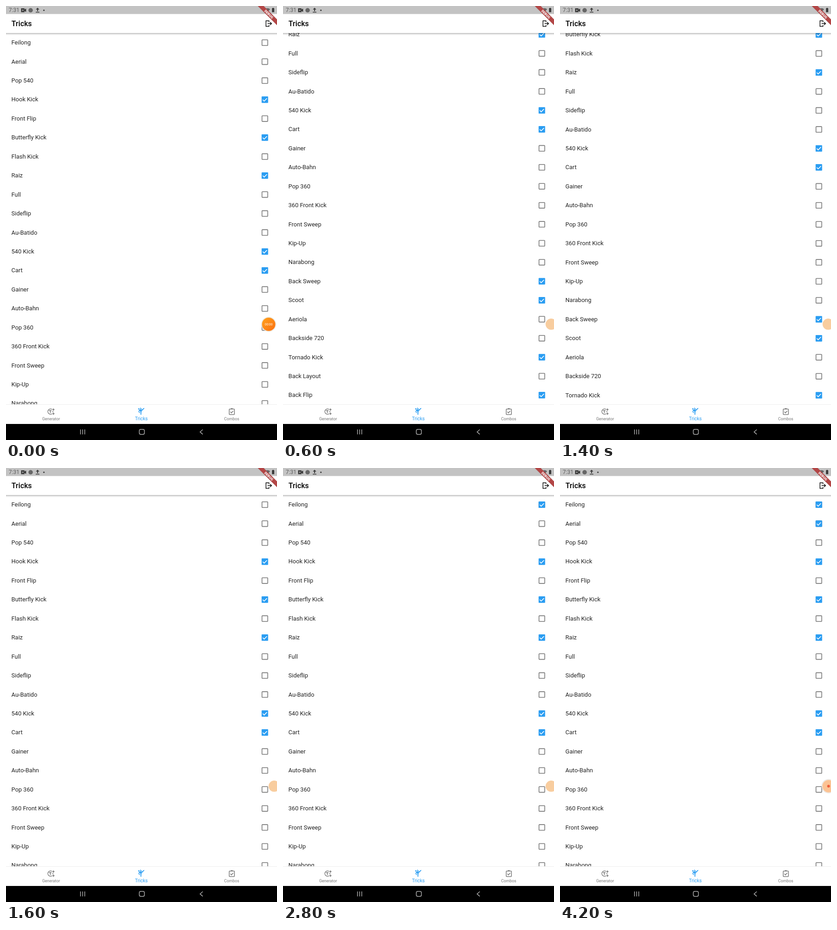
These frames come from a looping animation (592 px wide and 947 px high, 4.3 s). An HTML page:

```html
<!DOCTYPE html>
<html lang="en">
<head>
<meta charset="utf-8">
<title>Tricks</title>
<style>
  html, body { margin: 0; width: 100%; height: 100%; overflow: hidden; background: #fff; }
  svg { display: block; font-family: Roboto, "Liberation Sans", sans-serif; }
  .line { fill: none; stroke-width: 1.5; }
  .row text { font-size: 13px; fill: #242424; }
  .empty { fill: none; stroke: #777; stroke-width: 1.6; }
  .fill { fill: #2a9df2; }
  .tick { fill: none; stroke: #fff; stroke-width: 1.6; }

  /* Everything moves in 100 ms steps over a 4300 ms loop */
  .anim { animation: 4300ms step-end infinite; }
  #list { animation-name: scroll; }
  #glow { animation-name: glow; opacity: 0; }
  #ball { animation-name: ball; }
  #docked { animation-name: docked; opacity: 0; }
  #pressed { animation-name: pressed; opacity: 0; }
  .half { animation-name: half; opacity: 0; }
  .on0 { animation-name: on0; opacity: 0; }
  .on1 { animation-name: on1; opacity: 0; }

  @keyframes scroll {
    0% { transform: translateY(0); }
    4.65% { transform: translateY(-40px); }
    6.97% { transform: translateY(-165px); }
    9.3% { transform: translateY(-265px); }
    11.62% { transform: translateY(-302px); }
    13.95% { transform: translateY(-308px); }
    32.55% { transform: translateY(-225px); }
    34.88% { transform: translateY(-55px); }
    37.2%, 100% { transform: translateY(0); }
  }
  @keyframes glow {
    0% { opacity: 0; transform: translateY(30px); }
    18.6% { opacity: .6; transform: translateY(30px); }
    20.93% { opacity: 1; transform: translateY(0); }
    23.25% { opacity: .5; transform: translateY(20px); }
    25.58%, 100% { opacity: 0; transform: translateY(30px); }
  }
  @keyframes ball { 0% { opacity: 1; } 4.65%, 100% { opacity: 0; } }
  @keyframes docked { 0% { opacity: 0; } 4.65% { opacity: 1; } 97.67%, 100% { opacity: 0; } }
  @keyframes pressed { 0% { opacity: 0; } 97.67%, 100% { opacity: 1; } }
  @keyframes half { 0% { opacity: 0; } 62.79% { opacity: 1; } 65.11%, 100% { opacity: 0; } }
  @keyframes on0 { 0% { opacity: 0; } 65.11%, 100% { opacity: 1; } }
  @keyframes on1 { 0% { opacity: 0; } 81.39%, 100% { opacity: 1; } }
</style>
</head>
<body>
<svg width="592" height="947" viewBox="0 0 592 947">
  <defs>
    <clipPath id="view"><rect y="59" width="592" height="811"/></clipPath>
    <linearGradient id="shade" x2="0" y2="1">
      <stop stop-color="#000" stop-opacity=".3"/>
      <stop offset=".4" stop-color="#000" stop-opacity=".12"/>
      <stop offset="1" stop-color="#000" stop-opacity="0"/>
    </linearGradient>
    <linearGradient id="orange" x2="1" y2="1">
      <stop stop-color="#ffa21c"/>
      <stop offset="1" stop-color="#fb7012"/>
    </linearGradient>
  </defs>
  <rect width="592" height="947" fill="#fff"/>

  <g clip-path="url(#view)">
    <g id="list" class="anim"></g>
    <circle id="glow" class="anim" cx="310" cy="2315" r="1515" fill="#2187c8" fill-opacity=".095"/>
  </g>

  <!-- App bar -->
  <rect y="59" width="592" height="5" fill="url(#shade)"/>
  <rect y="17" width="592" height="42" fill="#fff"/>
  <text x="12" y="43.8" font-size="16.2" font-weight="500">Tricks</text>
  <g class="line" stroke="#111">
    <path d="M574.5 35V32.2H567.9V44.4H574.5V41.6M571.5 38.3H580M577 35.2L580.1 38.3L577 41.4"/>
  </g>

  <!-- Status bar -->
  <rect width="592" height="17.5" fill="#c3c3c3"/>
  <text x="6" y="13.4" font-size="12" fill="#5c5c5c">7:31</text>
  <g fill="#3c3c3c">
    <path d="M33 5H40.5V7.8L44 5.5V13L40.5 10.7V13.5H33Z"/>
    <path d="M35 9.2H38.5M36.8 7.5V11" stroke="#c3c3c3"/>
    <circle cx="53.8" cy="9.3" r="4.8" fill="#666"/>
    <path d="M69 3.8L72.8 7.8H70V11.5H68V7.8H65.2ZM65 12.8H73V14.2H65Z"/>
    <circle cx="82.8" cy="9.3" r="1.6"/>
    <path d="M566 7Q571.5 2.5 577 7L571.5 13.5Z" fill="#666"/>
    <path d="M581 5H582.3V4H584.7V5H586V13.5H581Z"/>
  </g>
  <g transform="translate(592 0) rotate(45)">
    <rect x="-32" y="20.3" width="64" height="9.8" fill="#000" opacity=".12"/>
    <rect x="-32" y="20.7" width="64" height="8.9" fill="#b34646"/>
    <text y="27.8" font-size="7.4" font-weight="900" text-anchor="middle" fill="#fff">DEBUG</text>
  </g>

  <!-- Tab bar -->
  <rect y="869" width="592" height="43" fill="#fff"/>
  <rect y="869" width="592" height="1" fill="#eee"/>
  <g font-size="8.9" text-anchor="middle" fill="#777">
    <text x="98.5" y="903.6">Generator</text>
    <text x="493" y="903.6">Combos</text>
    <text x="295.7" y="903.8" font-size="10.36" fill="#2a9df2">Tricks</text>
  </g>
  <g class="line" stroke="#777" stroke-width="1.3">
    <path d="M100.5 880.2A5.8 5.8 0 1 0 100.5 889.8M102.3 883.5Q102.8 885 102.3 886.5"/>
    <path d="M94 882.7H99.5M96.7 882.7V888.2M101.2 880.6H106M103.6 878.2V883M101.2 889.6H106M103.6 887.2V892"/>
    <rect x="487.6" y="879.5" width="11.4" height="12" rx="1"/>
    <path d="M490.2 885.5L492.4 887.8L496.5 883.5"/>
    <path d="M491.5 879.2Q493.3 876.6 495.1 879.2"/>
  </g>
  <g transform="translate(286.6 875.6) scale(.74)" fill="#2a9df2">
    <circle cx="5" cy="5" r="2"/>
    <path d="M19.8 2L11.6 8.7L10.4 7.7L14 5.6L9.4 1L8 2.4L10.7 5.1L5 8.5L3.8 12.8L6.3 17L8 16L6 12.5L6.6 10.2L9.5 12L10 22H12L12.5 12L21.3 3.4Z"/>
  </g>

  <!-- System buttons -->
  <rect y="912" width="592" height="35"/>
  <g class="line" stroke="#aaa">
    <path d="M162.7 924V934.8M167.4 924V934.8M172.1 924V934.8"/>
    <rect x="291.2" y="923.8" width="11.2" height="11" rx="3.2"/>
    <path d="M429.8 924.2L424 929.4L429.8 934.6"/>
  </g>

  <!-- Floating recorder button -->
  <g id="ball" class="anim">
    <circle cx="573.8" cy="694.5" r="16.3" fill="#ddd" opacity=".7"/>
    <circle cx="573.8" cy="694.5" r="15.4" fill="#f4ead9"/>
    <circle cx="573.8" cy="694.5" r="14.6" fill="url(#orange)"/>
    <text x="573.8" y="697" font-size="6.8" text-anchor="middle" fill="#fff">00:00</text>
  </g>
  <circle id="docked" class="anim" cx="585.8" cy="694.3" r="12.2" fill="#f8cd9f"/>
  <g id="pressed" class="anim">
    <circle cx="586.8" cy="694.3" r="15.6" fill="#ddd" opacity=".7"/>
    <circle cx="586.8" cy="694.3" r="14.6" fill="#f5e6d8"/>
    <circle cx="586.8" cy="694.3" r="13.4" fill="#fbc394"/>
    <circle cx="586.6" cy="694.3" r="3" fill="#f0603c"/>
  </g>
</svg>
<script>
  // A trailing * marks a trick that is already ticked
  const tricks = `Feilong,Aerial,Pop 540,Hook Kick*,Front Flip,Butterfly Kick*,Flash Kick,Raiz*,Full,
Sideflip,Au-Batido,540 Kick*,Cart*,Gainer,Auto-Bahn,Pop 360,360 Front Kick,Front Sweep,Kip-Up,
Narabong,Back Sweep*,Scoot*,Aeriola,Backside 720,Tornado Kick*,Back Layout,Back Flip*`.split(/,\s*/);
  const pitch = 41.43;

  const empty = '<rect class="empty" x="559.3" y="-6.2" width="12.4" height="12.4" rx=".8"/>';
  const checked = cls => `<g class="${cls}">
    <rect class="fill" x="558.4" y="-7.1" width="14.2" height="14.2" rx="1.2"/>
    <path class="tick" d="M560.9 .2L564 3.3L570 -2.8"/></g>`;
  const half = `<g class="anim half"><rect class="fill" x="558.4" y="-7.1" width="14.2" height="14.2" rx="1.2"/>
    <rect x="562" y="-3.5" width="7" height="7" fill="#fff"/></g>`;

  const box = (ticked, i) => {
    if (ticked) return checked('');
    if (i === 0) return empty + half + checked('anim on0');
    if (i === 1) return empty + checked('anim on1');
    return empty;
  };

  document.getElementById('list').innerHTML = tricks.map((name, i) =>
    `<g class="row" transform="translate(0 ${80 + i * pitch})">
      <text x="11.8" y="4.2">${name.replace('*', '')}</text>${box(name.endsWith('*'), i)}</g>`
  ).join('');
</script>
</body>
</html>
```
